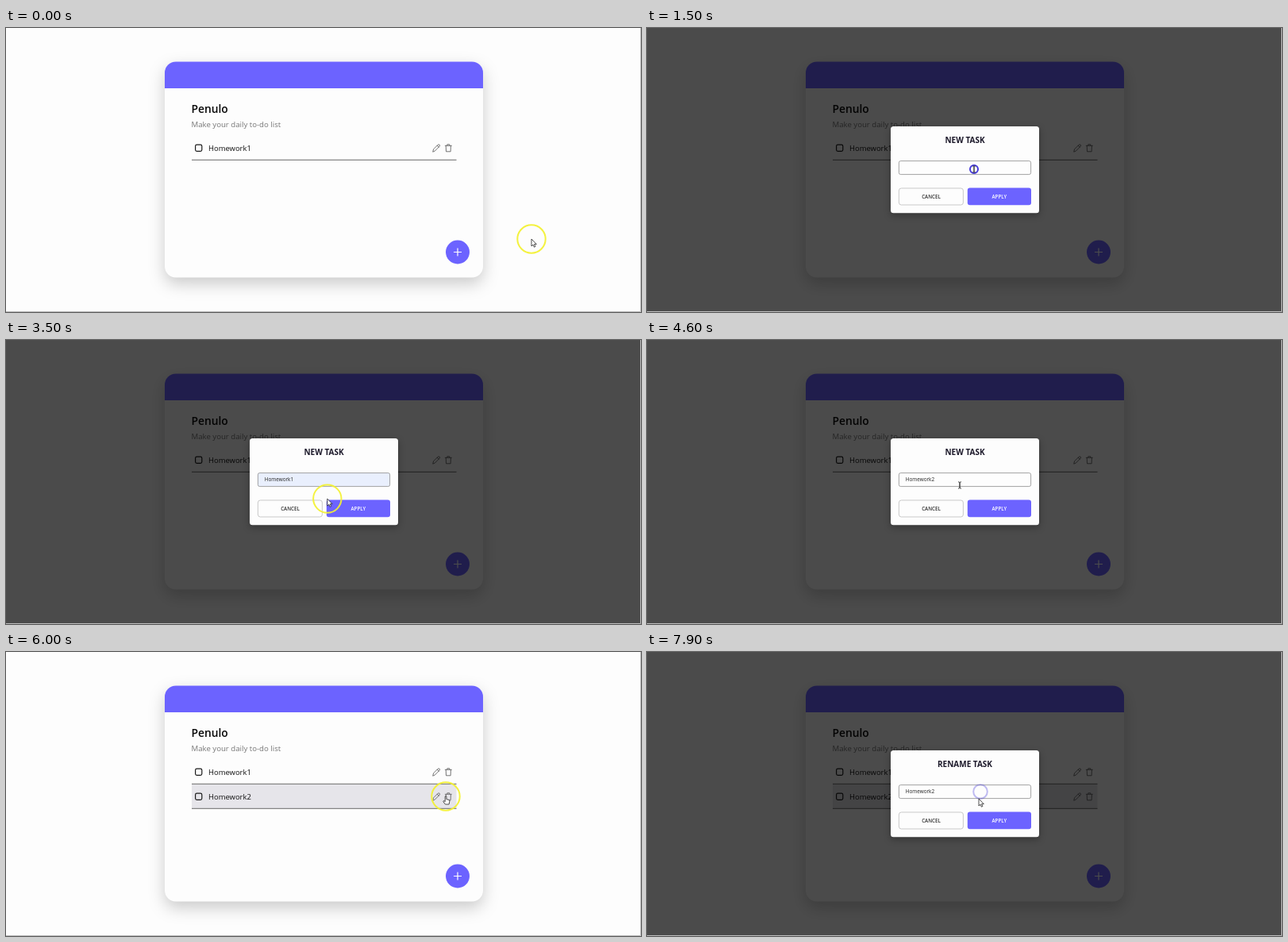
Animation, 800 px wide and 358 px high, one loop 8000 ms. Source, as an HTML page:

```html
<!DOCTYPE html>
<html lang="en">
<head>
<meta charset="utf-8">
<title>To-do list</title>
<style>
  html, body { margin: 0; width: 100%; height: 100%; overflow: hidden; background: #fdfdfd; }
  svg { display: block; width: 800px; height: 358px; font-family: "Open Sans", "Noto Sans", sans-serif; }
  .card { filter: drop-shadow(0 8px 10px rgba(0, 0, 0, .2)); }
  .panel { filter: drop-shadow(0 3px 4px rgba(0, 0, 0, .3)); }
  .icon { fill: none; stroke: #666; stroke-width: .9; stroke-linejoin: round; stroke-linecap: round; }
  .label { font-size: 6.2px; font-weight: 600; text-anchor: middle; }
  .item { font-size: 6.1px; font-weight: 700; fill: #f4f4f4; }
  .pointer { stroke-width: .8; stroke-linejoin: round; fill: #fff; stroke: #222; }
</style>
</head>
<body>
<svg viewBox="0 0 800 358">
  <defs>
    <g id="row">
      <rect x="238.6" y="147.1" width="8.2" height="8.2" rx="1.8" fill="none" stroke="#1b1b1b" stroke-width="1.2"/>
      <g class="icon">
        <path d="M537.8 155.8l.8-3 5.6-5.6q1-.8 1.9 0t.1 1.9l-5.6 5.7zM543.2 148.2l2.1 2"/>
        <path d="M553.3 148.3h8M555.8 148v-1.2h3V148M554.2 148.5l.3 7.3h5.6l.3-7.3"/>
      </g>
      <path d="M234 166.3h333.5" stroke="#686868"/>
    </g>
  </defs>

  <rect width="800" height="358" fill="#fdfdfd"/>
  <g class="card">
    <rect x="200" y="42.5" width="401" height="272" rx="14" fill="#fdfdfd"/>
    <path d="M200 76V56.5a14 14 0 0 1 14-14h373a14 14 0 0 1 14 14V76z" fill="#6c63ff"/>
  </g>
  <text x="233.5" y="107.2" font-size="13.8" font-weight="600" fill="#080808">Penulo</text>
  <text x="233.5" y="125.2" font-size="9.65" fill="#777">Make your daily to-do list</text>
  <use href="#row"/>
  <text x="255" y="155.2" font-size="9.45" fill="#111">Homework1</text>
  <g id="secondRow">
    <rect id="rowHover" x="234" y="167" width="333.5" height="30" fill="#e6e5ea"/>
    <use href="#row" y="31"/>
    <text x="255" y="186.2" font-size="9.45" fill="#111">Homework2</text>
  </g>
  <circle cx="569" cy="282.5" r="15" fill="#6c63ff"/>
  <path d="M564 282.5h10M569 277.5v10" stroke="#fff" stroke-width="1.2"/>

  <rect id="shade" width="800" height="358" fill-opacity=".7"/>
  <path d="M799.5 0v357.5H0" fill="none" stroke="#bdbdbd"/>

  <g id="modal">
    <rect class="panel" x="307" y="124" width="187" height="109.3" rx="3.5" fill="#fdfdfd"/>
    <text id="heading" x="400.5" y="144.7" text-anchor="middle" font-size="10" font-weight="700" fill="#1d1a2b"></text>
    <rect id="field" x="317.4" y="167.6" width="166.2" height="17" rx="2.2" stroke="#8c8c8c" stroke-width=".8"/>
    <text id="value" x="325.7" y="178.4" fill="#222"></text>
    <rect x="317.4" y="202" width="81" height="21" rx="3" fill="#fdfdfd" stroke="#bbb" stroke-width=".8"/>
    <text class="label" x="358" y="214.8" fill="#333">CANCEL</text>
    <rect x="403.8" y="201.6" width="80.2" height="21.6" rx="3" fill="#6c63ff"/>
    <text class="label" x="443.8" y="214.8" fill="#fff">APPLY</text>
  </g>

  <g id="menu">
    <path d="M375 189.7l4.3-4.7 4.3 4.7z" fill="#1e191d"/>
    <rect x="368" y="189.5" width="82" height="117.3" rx="3" fill="#1e191d"/>
    <g id="menuHover">
      <rect x="368" y="191.7" width="82" height="18.8" fill="#363336"/>
      <path d="M436.8 199.2l4 4m0-4l-4 4" stroke="#ccc" stroke-width=".8"/>
    </g>
    <g id="items"></g>
  </g>

  <circle id="ripple" fill="none" stroke="#3022d8" stroke-width="2"/>
  <circle id="ring" r="17.7" fill="none" stroke="#f3f130" stroke-width="2" stroke-opacity=".92"/>
  <g id="cursor">
    <path id="arrow" class="pointer" d="M0 0v9l2-1.8 1.4 3 1.5-.7-1.4-2.9h2.8z"/>
    <path id="beam" d="M-2-4.2q2 0 2 1.2V3q0 1.2-2 1.2M2-4.2Q0-4.2 0-3V3Q0 4.2 2 4.2" fill="none" stroke="#333" stroke-width=".9"/>
    <path id="hand" class="pointer" d="M-.8 0q.9-1 1.7 0v3.6l3.2.8q1 .4.8 1.5l-.8 4.1H-.6L-3.2 6.5q.2-1.2 1.2-.8l1.2 1z"/>
  </g>
</svg>
<script>
  const LOOP = 8000, STEP = 100, ITEM_TOP = 191.7, ITEM_HEIGHT = 18.8;
  const names = ["sdd", "Homework1", "asa", "ass", "sds", "asas"];
  const clicks = [600, 1500, 2700, 4400, 5000, 6600, 7800];

  // Places where the pointer rests: arrival, departure, x, y
  const stops = [
    [0, 0, 662, 266],       // idle
    [400, 600, 572, 287],   // add button
    [1400, 1600, 412, 178], // empty field
    [2300, 2700, 418, 221], // suggestion
    [4200, 4600, 394, 183], // field being edited
    [5000, 5100, 444, 212], // apply
    [5500, 5500, 561, 204], // below the new row
    [5900, 6100, 554, 182], // trash icon
    [6300, 6600, 544, 181], // pencil icon
    [7300, 7500, 379, 177], // field again
    [7800, 7800, 420, 176],
    [7900, LOOP, 418, 185]
  ];

  const el = id => document.getElementById(id);
  const show = (id, on) => el(id).style.display = on ? "" : "none";
  const set = (id, attrs) => { for (const k in attrs) el(id).setAttribute(k, attrs[k]); };
  const ease = k => k * k * (3 - 2 * k);

  el("items").innerHTML = names.map((name, i) =>
    `<text class="item" x="374.5" y="${203.4 + i * ITEM_HEIGHT}">${name}</text>`).join("");

  function pointerAt(t) {
    const i = stops.findLastIndex(([arrival]) => arrival <= t);
    const [, departure, x, y] = stops[i];
    if (t <= departure) return [x, y];
    const [arrival, , nextX, nextY] = stops[i + 1];
    const k = ease((t - departure) / (arrival - departure));
    return [x + (nextX - x) * k, y + (nextY - y) * k];
  }

  function typedText(t) {
    if (t >= 4300) return "Homework2";
    if (t >= 3900) return "Homework";
    return t >= 2800 ? "Homework1" : "";
  }

  function drawPointer(t, x, y, kind) {
    // A click hides the yellow ring while a blue one grows and fades.
    const click = clicks.find(c => t >= c && t < c + 300);
    const age = (t - click) / 100;
    show("ripple", click);
    show("ring", !click);
    if (click) {
      const [cx, cy] = pointerAt(click);
      set("ripple", { cx, cy, r: 5 + 3.8 * age, opacity: Math.max(0, .9 - .6 * age) });
    }
    set("ring", { cx: x, cy: y });
    set("cursor", { transform: `translate(${x} ${y})` });
    for (const id of ["arrow", "beam", "hand"]) show(id, id === kind);
  }

  function draw(t) {
    const [x, y] = pointerAt(t);
    const inside = (left, top, right, bottom) => x >= left && x <= right && y >= top && y <= bottom;
    const renaming = t >= 6600;
    const modal = renaming || (t >= 600 && t < 5100);
    const menu = t >= 1600 && t < 2800;
    const hovered = menu && y >= ITEM_TOP ? Math.floor((y - ITEM_TOP) / ITEM_HEIGHT) : -1;
    const preview = hovered >= 0;

    show("secondRow", t >= 5100);
    show("rowHover", renaming || (!modal && inside(234, 167, 567, 198)));
    show("shade", modal);
    show("modal", modal);
    show("menu", menu);
    show("menuHover", preview);
    set("menuHover", { transform: `translate(0 ${hovered * ITEM_HEIGHT})` });

    el("heading").textContent = renaming ? "RENAME TASK" : "NEW TASK";
    el("value").textContent = preview ? names[hovered] : typedText(t);
    set("value", { "font-size": preview ? 4.9 : 6.4, "font-weight": preview ? 600 : 400 });
    set("field", { fill: preview || (t >= 2800 && t < 3900) ? "#e9effd" : "#fdfdfd" });

    const overField = modal && !menu && inside(317, 167, 484, 184.5);
    const overButton = modal
      ? !menu && inside(317, 202, 484, 223)
      : inside(536, 143, 563, 190) || Math.hypot(x - 569, y - 282.5) < 15;
    drawPointer(t, x, y, overField ? "beam" : overButton ? "hand" : "arrow");
  }

  function frame() {
    draw(Math.floor(performance.now() % LOOP / STEP) * STEP);
    requestAnimationFrame(frame);
  }
  frame();
</script>
</body>
</html>
```
